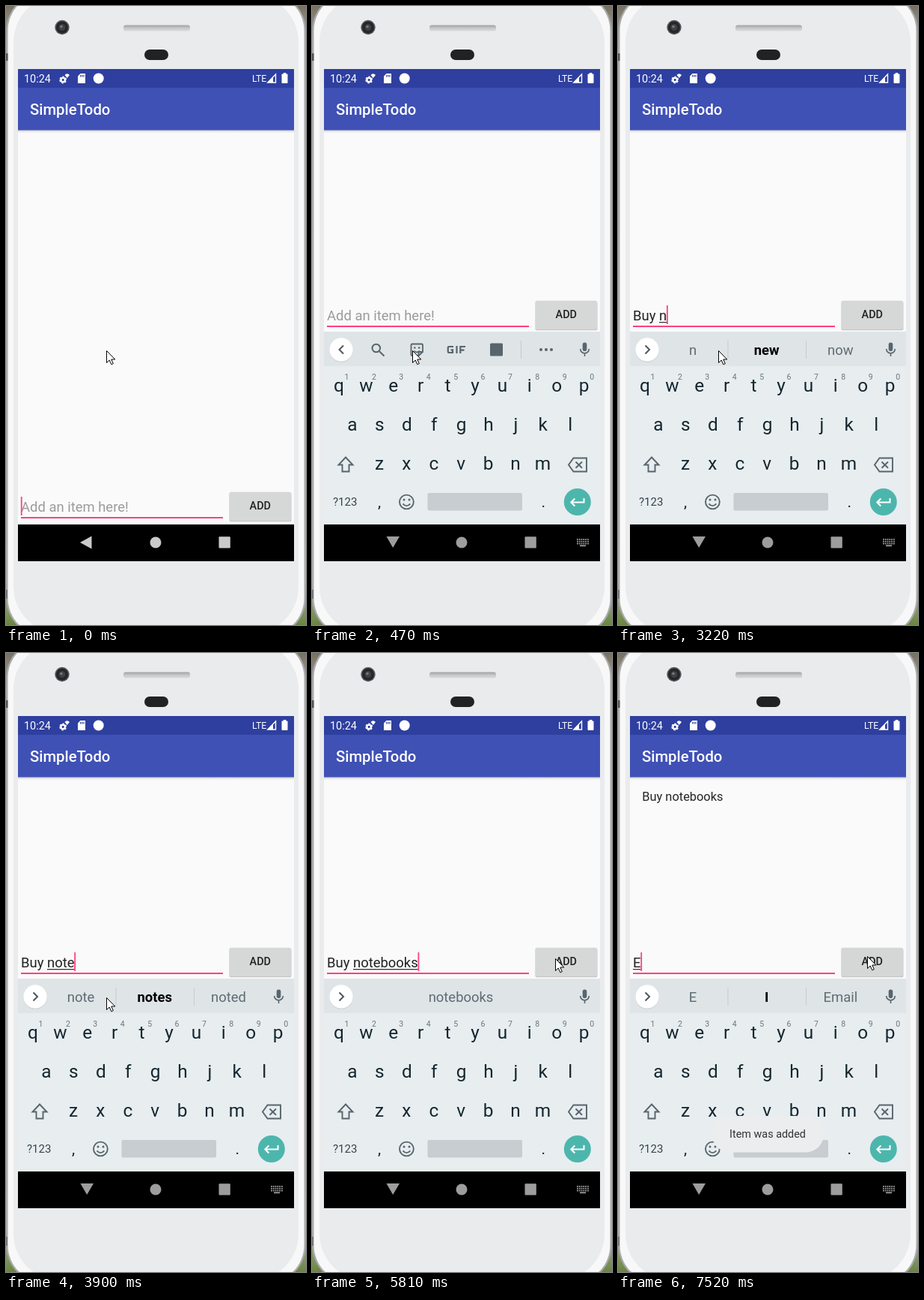
An HTML page with a canvas that plays this animation: 401x825 px, repeating every 8 s.

```html
<!DOCTYPE html>
<html lang="en">
<head>
<meta charset="utf-8">
<title>Todo app demo</title>
<style>
  html, body { margin: 0; width: 100%; height: 100%; overflow: hidden; background: #e9ebed; }
  canvas { display: block; width: 401px; height: 825px; }
</style>
</head>
<body>
<canvas id="stage" width="401" height="825"></canvas>
<script>
const ctx = document.getElementById('stage').getContext('2d');
const LOOP = 8000;
const PINK = '#ff4081', ICON = '#58656c', KEY = '#14272f';

// Each track holds [start, value] pairs; the last one begun applies.
const CARET = [[0, 1], [470, 0], [930, 1], [1390, 0], [1980, 1], [5390, 0], [5810, 1], [6940, 0], [7370, 1]];
const TYPED = [[0, ''], [2270, 'B'], [2430, 'Bu'], [2550, 'Buy'], [2790, 'Buy '], [3220, 'Buy n'],
  [3500, 'Buy no'], [3620, 'Buy not'], [3900, 'Buy note'], [4170, 'Buy noteb'], [4450, 'Buy notebo'],
  [4580, 'Buy noteboo'], [4730, 'Buy notebook'], [4850, 'Buy notebooks'], [6360, ''], [7520, 'E']];
const HINTS = [[0, ''], [2270, 'B But By'], [2430, 'Bu But Buy'], [2670, 'Buy But Buying'], [2790, 'it a the'],
  [3220, 'n new now'], [3500, 'no not now'], [3620, 'not note now'], [3900, 'note notes noted'],
  [4170, 'noteb notebook Notebook'], [4450, 'notebo notebook Notebook'], [4580, 'noteboo notebook Notebook'],
  [4730, 'notebook notebooks Notebook'], [4850, 'notebooks'], [6690, ''], [7520, 'E I Email']];
const MOUSE = [[0, [134, 459]], [5390, [170, 454]], [5530, [209, 449]], [5680, [275, 427]],
  [5810, [325, 407]], [5930, [333, 404]]];
const BUTTON = [[0, '#d6d7d7'], [6210, '#c4c5c5'], [6360, '#cecfcf'], [6480, '#d5d6d6']];
const TOAST = [[0, 0], [6810, .5], [6940, 1]];

function at(track, t) {
  let value;
  for (const [start, v] of track) if (t >= start) value = v;
  return value;
}

function box(x, y, w, h, color, r = 0) {
  ctx.fillStyle = color;
  ctx.beginPath();
  ctx.roundRect(x, y, w, h, r);
  ctx.fill();
}

function disc(x, y, r, color) {
  ctx.fillStyle = color;
  ctx.beginPath();
  ctx.arc(x, y, r, 0, Math.PI * 2);
  ctx.fill();
}

function shape(d, color) {
  ctx.fillStyle = color;
  ctx.fill(new Path2D(d));
}

function line(d, color, width = 2) {
  ctx.strokeStyle = color;
  ctx.lineWidth = width;
  ctx.stroke(new Path2D(d));
}

function text(s, x, y, size, color, align = 'left', weight = 400) {
  ctx.font = `${weight} ${size}px Roboto, sans-serif`;
  ctx.textAlign = align;
  ctx.fillStyle = color;
  ctx.fillText(s, x, y);
  return ctx.measureText(s).width;
}

function drawPhone() {
  const bg = ctx.createLinearGradient(0, 0, 0, 825);
  bg.addColorStop(0, '#77705f');
  bg.addColorStop(.06, '#b4b1ae');
  bg.addColorStop(.93, '#b9b8b6');
  bg.addColorStop(1, '#69853f');
  box(0, 0, 401, 825, bg);
  box(.5, -18, 400, 858, '#a9abad', 50);
  box(2.5, -17, 396, 856, '#f8f8f9', 50);
  box(10, -14, 381, 850, '#e9ebed', 62);
  box(0, 63, 2.5, 10, '#55575a');
  box(0, 778, 2, 12, '#77797c');

  disc(75, 28.5, 9.7, '#555759');
  disc(75, 28.5, 8, '#242628');
  disc(75, 28.5, 4.5, '#3d4044');
  disc(74, 27.5, 1.8, '#74797e');
  const metal = ctx.createLinearGradient(0, 25, 0, 34);
  metal.addColorStop(0, '#97999b');
  metal.addColorStop(.45, '#c3c5c7');
  metal.addColorStop(1, '#dedfe1');
  box(157, 25.5, 89, 8, metal, 3);
  box(185, 58, 32, 14, '#202224', 7);
}

function drawBars() {
  box(16, 84, 369, 656, '#fafafa');
  const shade = ctx.createLinearGradient(0, 165, 0, 169);
  shade.addColorStop(0, '#c9c9cc');
  shade.addColorStop(1, '#fafafa');
  box(16, 165, 369, 4, shade);
  box(16, 84, 369, 25, '#2e3f9f');
  box(16, 109, 369, 56.5, '#3f51b5');
  text('SimpleTodo', 32, 145, 20.3, '#fff', 'left', 500);

  text('10:24', 24, 101.7, 14.4, '#fff');
  ctx.setLineDash([2, 1.35]);
  line('M73 98.5a3.2 3.2 0 1 0 6.4 0a3.2 3.2 0 1 0-6.4 0', '#fff', 3.4);
  ctx.setLineDash([]);
  line('M73.4 98.5a2.8 2.8 0 1 0 5.6 0a2.8 2.8 0 1 0-5.6 0', '#fff', 2);
  shape('M78.5 92q3-3.5 6.5 0l-3.2 4z', '#fff');
  shape('M99.5 90H106V103H96V93.5z', '#fff');
  for (const x of [99, 101.2, 103.4]) box(x, 92, 1.2, 2.6, '#2e3f9f');
  disc(123.7, 96.5, 7, '#fff');

  text('LTE', 329, 101, 12.2, '#fff');
  line('M360.5 91V102H349.8z', '#fff', 1.4);
  shape('M354 98L357 95V102H350z', '#fff');
  box(368.5, 90.5, 8, 12.5, '#fff', 1);
  box(370.8, 89, 3.5, 2, '#fff');
}

function drawNav(open) {
  const c = open ? '#9d9d9d' : '#cacaca';
  box(16, 691, 369, 49, '#000');
  shape(open ? 'M99.5 707H117L108.2 722z' : 'M99 715L114.5 706.5V723.5z', c);
  disc(200, 715, 7.5, c);
  box(284.5, 707.3, 15.3, 15.3, c, 1);
  if (!open) return;
  for (let r = 0; r < 3; r++)
    for (let i = 0; i < 6; i++) box(354 + i * 2.8, 710 + r * 2.8, 1.8, 1.8, c);
  box(358, 718.4, 8, 1.8, c);
}

function drawField(t, dy) {
  const typed = at(TYPED, t);
  const base = 674 + dy;
  let end = 0;
  if (typed) {
    end = text(typed, 20, base, 18.45, '#212121');
    const word = typed.split(' ').pop();
    if (word) {
      const w = ctx.measureText(word).width;
      box(20 + end - w, base + 2, w, 1.2, '#303030');
    }
  } else {
    text('Add an item here!', 20, base, 18.45, '#9b9b9b');
  }
  box(20, 681 + dy, 270, 2, PINK);
  if (at(CARET, t)) box(19.8 + end, 654 + dy, 1.8, 25, PINK);

  box(298.5, 649 + dy, 83, 38.3, '#c6c6c6', 2);
  box(298.5, 647.7 + dy, 82.5, 38.2, at(BUTTON, t), 2);
  text('ADD', 339.8, 671.3 + dy, 14.4, '#212121', 'center', 500);
}

function drawTools() {
  line('M42 452.5L36.5 458L42 463.5', '#4d5960', 2);
  line('M80.5 456a5.3 5.3 0 1 0 10.6 0a5.3 5.3 0 1 0-10.6 0M90 460.3L96.5 466.5', ICON);
  line('M134 450.5H146.5Q148 450.5 148 452V461L142.5 466H134Q132.5 466 132.5 464.5V452Q132.5 450.5 134 450.5M148 461H142.5V466M136.5 459.5Q140 463.5 143.7 459.5', ICON, 1.8);
  disc(137.3, 455.5, 1.3, ICON);
  disc(143.2, 455.5, 1.3, ICON);
  line('M189 454H183Q181.8 454 181.8 455.2V460.8Q181.8 462 183 462H188V458.3H185.5M193.5 453V463M198.3 463V454H205M198.3 458.6H203.5', ICON, 2.2);
  box(238, 449.5, 17, 17, ICON, 1.5);
  box(279, 446, 1, 24, '#c5cbce');
  for (const x of [306, 313, 320]) disc(x, 458, 2, ICON);
}

function drawHints(words) {
  line('M36.5 452.5L42 458L36.5 463.5', '#4d5960', 2);
  if (words.length === 1) {
    text(words[0], 199, 465, 18.45, '#5f6c73', 'center');
    return;
  }
  words.forEach((w, i) => {
    const mid = i === 1;
    text(w, 100 + i * 98.7, 465, 18.45, mid ? '#000' : '#5f6c73', 'center', mid ? 700 : 400);
  });
  for (const x of [146.5, 251]) box(x, 446, 1, 24, '#c5cbce');
}

function drawKeyboard(t) {
  box(16, 434, 369, 257, '#e8edf0');
  box(16, 434, 369, 46, '#dfe4e7');
  disc(39, 458.8, 16, '#cdd2d5');
  disc(39, 458, 15.7, '#fff');
  const hints = at(HINTS, t);
  if (hints) drawHints(hints.split(' '));
  else drawTools();
  box(361.7, 448.5, 5.6, 11.5, ICON, 2.8);
  line('M358.7 457a5.8 5.8 0 0 0 11.6 0M364.5 463V467', ICON, 1.6);

  [['qwertyuiop', 36], ['asdfghjkl', 54], ['zxcvbnm', 90]].forEach(([row, x0], r) => {
    [...row].forEach((ch, i) => {
      const x = x0 + i * 36.4;
      text(ch, x, 514.3 + r * 51.7, 24.4, KEY, 'center');
      if (!r) text((i + 1) % 10, x + 10.5, 498, 10.5, '#6a777e', 'center');
    });
  });
  line('M45 601.5L35.5 611.5H40.5V620.5H49.5V611.5H54.5z', ICON, 1.9);
  line('M349.5 602.5H367V620.5H349.5L343 611.5zM352.5 607.5L361 615.7M361 607.5L352.5 615.7', ICON, 1.9);

  text('?123', 28, 666, 15, '#34454d');
  text(',', 90, 668, 21, KEY, 'center');
  text('.', 309.3, 668, 21, KEY, 'center');
  line('M117 661a9.4 9.4 0 1 0 18.8 0a9.4 9.4 0 1 0-18.8 0', ICON, 1.9);
  disc(123, 658, 1.5, ICON);
  disc(130, 658, 1.5, ICON);
  line('M121.5 663.3Q126.4 669 131.3 663.3', ICON, 1.9);
  box(154.5, 649, 126.5, 23.5, '#c7cdd0', 2);
  disc(354.8, 661, 18, '#4db6ac');
  line('M363.5 656V661.5H346.5M351.3 656.5L346.3 661.5L351.3 666.5', '#fff', 2);
}

function drawToast(alpha) {
  ctx.globalAlpha = alpha;
  box(125.5, 617, 149.5, 48.5, '#ebedee', 24);
  text('Item was added', 200, 646.3, 14.4, '#333', 'center');
  ctx.globalAlpha = 1;
}

function drawMouse([x, y]) {
  ctx.save();
  ctx.translate(x + .5, y + .5);
  const arrow = 'M0 0V16L3.7 12.5L6.3 18.2L8.8 17.1L6.3 11.5H11.3z';
  shape(arrow, '#fff');
  line(arrow, '#000', 1);
  ctx.restore();
}

function draw(t) {
  const open = t >= 320;
  drawPhone();
  drawBars();
  if (t >= 6690) text('Buy notebooks', 32.3, 196.5, 16.4, '#262626');
  drawField(t, open ? -255 : 0);
  if (open) {
    const rising = t < 470;
    ctx.save();
    ctx.beginPath();
    ctx.rect(16, 434, 369, 257);
    ctx.clip();
    if (rising) {
      ctx.globalAlpha = .8;
      ctx.translate(0, 40);
    }
    drawKeyboard(t);
    ctx.restore();
  }
  drawNav(t >= 150);
  drawToast(at(TOAST, t));
  drawMouse(at(MOUSE, t));
}

const begin = performance.now();
function tick() {
  draw((performance.now() - begin) % LOOP);
  requestAnimationFrame(tick);
}
tick();
</script>
</body>
</html>
```
